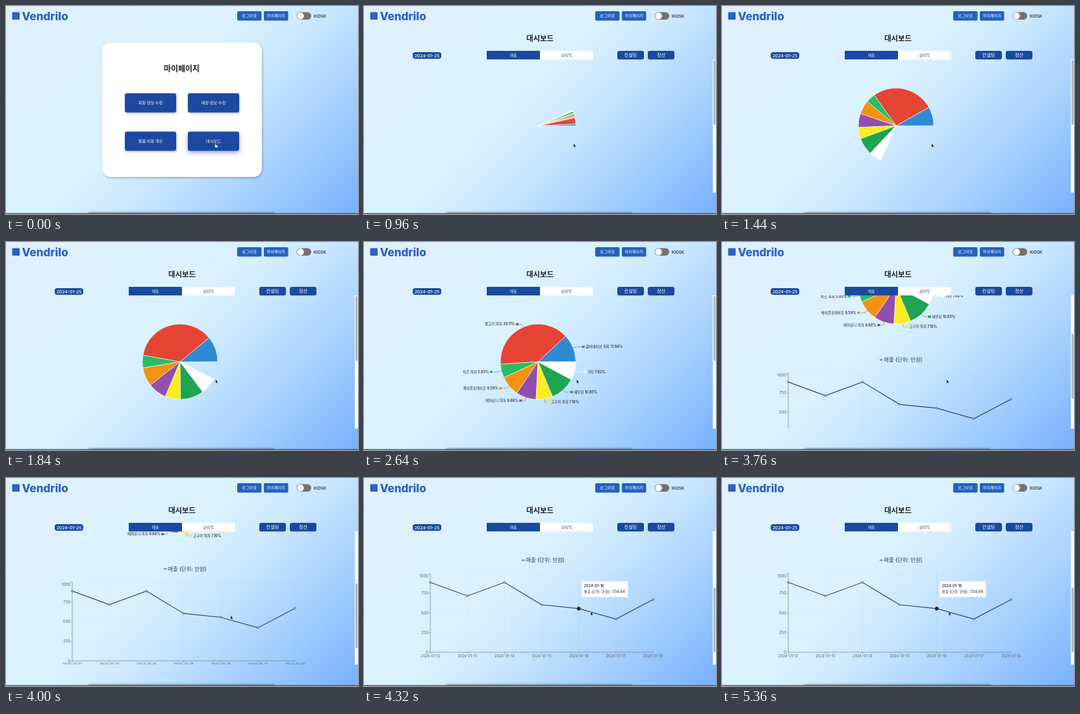
Recreate the animation shown at these times as an HTML page. Size 542x320 px, loop 5.44 s.

```html
<!DOCTYPE html>
<html lang="ko">
<head>
<meta charset="utf-8">
<title>대시보드</title>
<style>
html, body { margin: 0; width: 100%; height: 100%; overflow: hidden; }
svg { display: block; width: 100vw; height: 100vh; }
text { font-family: Inter, "Noto Sans CJK KR", "Noto Sans CJK", sans-serif; font-weight: 500; }
</style>
</head>
<body>
<svg id="stage" viewBox="0 0 542 320" preserveAspectRatio="none">
  <defs>
    <linearGradient id="sky" gradientUnits="userSpaceOnUse" x1="55.5" y1="-55.5" x2="486.5" y2="375.5">
      <stop offset="0" stop-color="#e0f0fc"/>
      <stop offset=".44" stop-color="#daf2fe"/>
      <stop offset=".56" stop-color="#cde9ff"/>
      <stop offset=".78" stop-color="#a4cfff"/>
      <stop offset="1" stop-color="#78b0ff"/>
    </linearGradient>
    <clipPath id="view"><rect y="82" width="537" height="205"/></clipPath>
    <filter id="soft" x="-20%" y="-30%" width="140%" height="170%"><feDropShadow dx="1" dy="1.5" stdDeviation="1.6" flood-color="#234" flood-opacity=".35"/></filter>
    <filter id="lift" x="-20%" y="-30%" width="140%" height="190%"><feDropShadow dx="0" dy="3" stdDeviation="3" flood-color="#1b4fa8" flood-opacity=".5"/></filter>
    <filter id="blur" x="-10%" y="-200%" width="120%" height="500%"><feGaussianBlur stdDeviation="1.2"/></filter>
  </defs>
  <rect width="542" height="320" fill="url(#sky)"/>
  <g id="header"></g>
  <g id="menu"></g>
  <g id="board">
    <g clip-path="url(#view)"><g id="content">
      <g id="pie" stroke="#fff" stroke-width=".6" stroke-linejoin="round"></g>
      <g id="labels"></g>
      <g id="chart"></g>
    </g></g>
    <g id="bar"></g>
    <g id="scrollbar">
      <rect x="537" y="82" width="5" height="205" fill="#f8fafc"/>
      <rect id="thumb" x="538.2" width="3.2" height="100" rx="1.6" fill="#b2b4b6"/>
    </g>
  </g>
  <rect x="126" y="317" width="288" height="6" rx="3" fill="#456" opacity=".5" filter="url(#blur)"/>
  <rect y="318.6" width="542" height="1.4" fill="#30629c"/>
  <path id="arrow" d="M0 0V6.2L1.4 5L2.4 7.2L3.4 6.8L2.4 4.6H4.3Z" fill="#111" stroke="#fff" stroke-width=".5"/>
  <path id="hand" d="M321.6 212.2q.7-.7 1.2.1l.6 1.5 2.1.5q.8.3.7 1.2l-.4 2.6h-3l-2-2.4q0-.9 1.2-.3z" fill="#fff" stroke="#333" stroke-width=".5"/>
</svg>
<script>
const LOOP = 5440, CX = 268, CY = 184.3, R = 58;
const NAVY = '#1a4a9f', BLUE = '#2460c0', INK = '#1c2028';
const $ = id => document.getElementById(id);

function add(parent, tag, attrs, content) {
  const el = document.createElementNS('http://www.w3.org/2000/svg', tag);
  for (const k in attrs) el.setAttribute(k, attrs[k]);
  if (content) el.textContent = content;
  return $(parent).appendChild(el) && el;
}
// y is the vertical middle of the glyphs
const label = (parent, s, x, y, size, fill = INK, anchor = 'start', weight = 500) =>
  add(parent, 'text', { x, y: y + size * .36, 'font-size': size, fill, 'text-anchor': anchor, style: `font-weight:${weight}` }, s);
const box = (parent, x, y, width, height, rx, fill, more) =>
  add(parent, 'rect', { x, y, width, height, rx, fill, ...more });
const line = (parent, d, stroke, width, more) =>
  add(parent, 'path', { d, stroke, 'stroke-width': width, fill: 'none', ...more });
function button(parent, s, x, y, w, h, rx, size, fill = NAVY, ink = '#fff', more) {
  box(parent, x, y, w, h, rx, fill, more);
  label(parent, s, x + w / 2, y + h / 2, size, ink, 'middle');
}

// Header
box('header', 9.5, 9.5, 11.5, 11.5, 1, '#2a62c4');
label('header', 'Vendrilo', 24.5, 15.5, 17, '#2a62c4', 'start', 800);
button('header', '로그아웃', 356, 8, 37.5, 14.5, 2, 6.2, BLUE);
button('header', '마이페이지', 397, 8, 37.5, 14.5, 2, 6.2, BLUE);
box('header', 447.5, 9.5, 22.5, 11.5, 5.75, '#727272');
add('header', 'circle', { cx: 453.5, cy: 15.2, r: 5.2, fill: '#fff' });
label('header', 'KIOSK', 474, 15.3, 6.2);

// Menu page
box('menu', 148, 56, 246, 207, 13, '#fff', { filter: 'url(#soft)' });
label('menu', '마이페이지', 270.5, 97, 12, INK, 'middle', 700);
['회원 정보 수정', '매장 정보 수정', '물품 비용 계산', '대시보드'].forEach((s, i) =>
  button('menu', s, 183 + i % 2 * 97, 134.3 + (i >> 1) * 59, 79, 29.5, 3, 6.2, NAVY, '#fff',
    { filter: `url(#${i == 3 ? 'lift' : 'soft'})` }));

// Dashboard controls
label('bar', '대시보드', 271, 50, 11.4, INK, 'middle', 700);
button('bar', '2024-01-25', 75, 71, 44, 10.2, 4, 6.8);
button('bar', '매출', 189, 69, 82, 13.2, 0, 5.8);
button('bar', '순이익', 271, 69, 81.5, 13.2, 0, 5.8, '#fff', '#243f70');
button('bar', '컨설팅', 390, 69, 41, 13.2, 3, 7.2);
button('bar', '정산', 437, 69, 41, 13.2, 3, 7.2);

// Pie
const slices = [
  ['콤비네이션 피자', 11.94, '#2f8ad6'], ['불고기 피자', 39.11, '#e54435'],
  ['치즈 피자', 5.85, '#29bd62'], ['케이준포테이토', 8.59, '#f39213'],
  ['페퍼로니 피자', 8.68, '#924fae'], ['고구마 피자', 7.16, '#fdec20'],
  ['새우링', 10.85, '#1fa454'], ['기타', 7.82, '#ffffff']];
const at = (turn, r) => [CX + r * Math.cos(turn * 2 * Math.PI), CY - r * Math.sin(turn * 2 * Math.PI)];
let sum = 0;
const sectors = slices.map(([name, pct, fill]) => {
  const from = sum / 100, to = (sum += pct) / 100, mid = (from + to) / 2;
  const [ex, ey] = at(mid, R + 5), side = ex > CX ? 1 : -1;
  const sx = ex + side * (2 + 7 * Math.abs(ex - CX) / (R + 5));
  line('labels', `M${at(mid, R)}L${ex} ${ey}H${sx - side * 1.5}`, fill == '#ffffff' ? fill : '#5a6b80', .6);
  box('labels', side > 0 ? sx : sx - 4.6, ey - 1.7, 4.6, 3.4, .5, fill);
  label('labels', `${name} ${pct.toFixed(2)}%`, sx + side * 6, ey, 5.5, INK, side > 0 ? 'start' : 'end');
  return { from, to, el: add('pie', 'path', { fill }) };
});
function drawPie(p) {
  for (const { from, to, el } of sectors)
    el.setAttribute('d', `M${CX} ${CY}L${at(from * p, R)}A${R} ${R} 0 0 0 ${at(to * p, R)}Z`);
  $('pie').style.display = p > 0 ? '' : 'none';
}

// Line chart, placed for the fully scrolled view
const END = 171, px = i => 102 + i * 57.17, py = v => 268 - v * .121;
const sales = [888, 715, 888, 603, 554.64, 421, 669];
$('chart').setAttribute('transform', `translate(0 ${END})`);
line('chart', 'M242.5 126.5h5.5', '#2f4368', .8);
add('chart', 'circle', { cx: 245.2, cy: 126.5, r: 1, fill: '#e4f2fd', stroke: '#2f4368', 'stroke-width': .7 });
label('chart', '매출 (단위: 만원)', 249.3, 126.3, 8.4, '#2f4368');
const grid = { 'stroke-dasharray': '1.4 1.4', opacity: .45 };
[0, 250, 500, 750, 1000].forEach(v => {
  line('chart', `M102 ${py(v)}H445`, '#aebfcd', .5, grid);
  line('chart', `M99.5 ${py(v)}h2.5`, '#666', .5);
  label('chart', String(v), 99, v == 1000 ? 150.5 : py(v), 6, '#5c6570', 'end', 400);
});
sales.forEach((v, i) => {
  line('chart', `M${px(i)} 147V268`, '#aebfcd', .5, grid);
  line('chart', `M${px(i)} 268v2.5`, '#666', .5);
  label('chart', `2024-01-${12 + i}`, px(i), 273.5, 5.6, '#5c6570', 'middle', 400);
});
line('chart', 'M102 147V268H445', '#6a737d', .6);
add('chart', 'g', { id: 'tip' });
line('tip', `M${px(4)} 147V268`, '#c3ced8', .5);
line('chart', 'M' + sales.map((v, i) => [px(i), py(v)]).join('L'), '#2f4368', 1.2);
sales.forEach((v, i) => add('chart', 'circle',
  { cx: px(i), cy: py(v), r: 1.4, fill: '#d8edfd', stroke: '#2f4368', 'stroke-width': .8 }));
add('chart', 'g', { id: 'tipbox' });
add('tipbox', 'circle', { cx: px(4), cy: py(sales[4]), r: 2.8, fill: '#1b2942' });
box('tipbox', 335, 158.7, 71.5, 24.6, .5, '#fff', { stroke: '#d5dbe1', 'stroke-width': .5 });
label('tipbox', '2024-01-16', 338.5, 166, 5.6);
label('tipbox', '매출 (단위: 만원) : 554.64', 338.5, 174.6, 5.6, '#2f4368');

// Timing
function ease(x) {  // cubic-bezier(.25,.1,.25,1)
  if (x <= 0 || x >= 1) return x <= 0 ? 0 : 1;
  const bez = (a, b, s) => 3 * a * s * (1 - s) ** 2 + 3 * b * s * s * (1 - s) + s ** 3;
  let lo = 0, hi = 1;
  for (let i = 0; i < 20; i++) {
    const m = (lo + hi) / 2;
    if (bez(.25, .25, m) < x) lo = m; else hi = m;
  }
  return bez(.1, 1, lo);
}
function track(keys, t) {
  const i = keys.findIndex(k => k[0] > t);
  if (i < 1) return i ? keys[keys.length - 1][1] : keys[0][1];
  const [t0, a] = keys[i - 1], [t1, b] = keys[i];
  return a + (b - a) * (t - t0) / (t1 - t0);
}
const scrollKeys = [[3360, 0], [3440, 31], [3600, 75], [3760, 116], [3920, 148], [4080, 167], [4160, END]];
const mouseX = [[2560, 322.5], [2960, 345.8], [4160, 345.8], [4280, 349]];
const mouseY = [[4160, 211.3], [4280, 205.5]];
const show = (id, on) => $(id).style.display = on ? '' : 'none';

function draw(t) {
  const open = t >= 400, scroll = track(scrollKeys, t), tip = t >= 4200;
  show('menu', !open);
  show('hand', !open);
  show('board', open);
  show('arrow', open);
  show('scrollbar', t >= 640);
  show('labels', t >= 2340);
  show('tip', tip);
  show('tipbox', tip);
  drawPie(ease((t - 840) / 1500));
  $('content').setAttribute('transform', `translate(0 ${-scroll})`);
  $('thumb').setAttribute('y', 83 + scroll * .5);
  $('arrow').setAttribute('transform', `translate(${track(mouseX, t)} ${track(mouseY, t)})`);
}
const start = performance.now();
function tick() {
  draw((performance.now() - start) % LOOP);
  requestAnimationFrame(tick);
}
tick();
</script>
</body>
</html>
```
